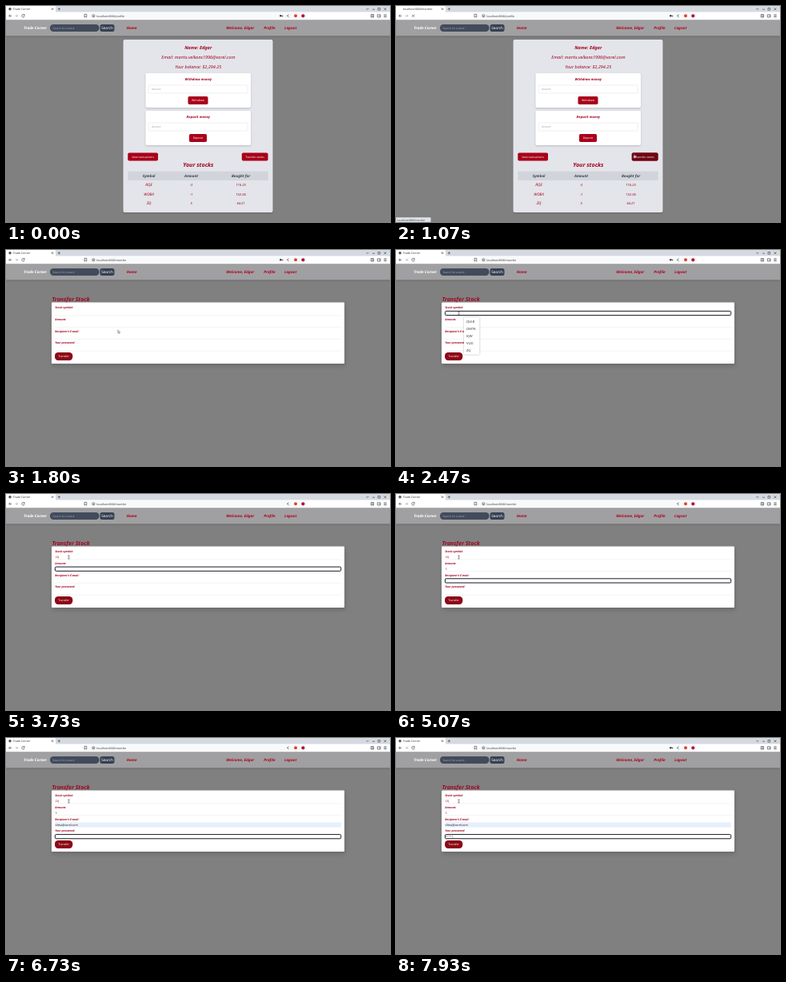
Write an HTML page that moves like this. It is 480 px wide and 270 px high and loops after 8 s.

```html
<!DOCTYPE html>
<html lang="en">
<head>
<meta charset="utf-8">
<title>Trade Corner</title>
<style>
html, body { margin: 0; width: 100%; height: 100%; overflow: hidden; background: #808080; }
svg { display: block; width: 480px; height: 270px; }
text { font-family: "Noto Sans", "Open Sans", sans-serif; text-rendering: geometricPrecision; white-space: pre; }
.b { font-weight: 700; font-style: italic; }
.i { font-style: italic; }
.mid { text-anchor: middle; }
.card { filter: drop-shadow(0 1px 1.2px rgba(0, 0, 0, .18)); }
.pop { filter: drop-shadow(0 .5px 1px rgba(0, 0, 0, .3)); }
.line { fill: none; stroke: #4a4d52; stroke-width: .7; }
</style>
</head>
<body>
<svg id="stage" viewBox="0 0 480 270"></svg>
<script>
const LOOP = 8000;
const RED = '#a3001f', NAV_RED = '#b00020', BUTTON = '#a90019', DARK_RED = '#8c0717', INK = '#33363b';
const NAME = 'Edgar', MAIL = 'martis.velkons1996@vorel.com', FRIEND = 'tilma@vorel.com';
const SITE = 'Trade Corner', HOST = 'localhost:8000/';
const stage = document.getElementById('stage');

function add(parent, tag, attrs = {}) {
  const el = document.createElementNS('http://www.w3.org/2000/svg', tag);
  for (const k in attrs) el.setAttribute(k, attrs[k]);
  return parent.appendChild(el);
}
const group = parent => add(parent, 'g');
const box = (g, x, y, width, height, fill, rx = 0, cls = '') =>
  add(g, 'rect', { x, y, width, height, fill, rx, class: cls });
const line = (g, d, attrs = {}) => add(g, 'path', { d, class: 'line', ...attrs });
const dot = (g, cx, cy, r, fill) => add(g, 'circle', { cx, cy, r, fill });
function label(g, x, y, str, size, fill, cls = '') {
  const el = add(g, 'text', { x, y, 'font-size': size, fill, class: cls });
  el.textContent = str;
  return el;
}

// Visible only between the given times, with hard cuts.
function show(el, ...spans) {
  const on = t => spans.some(([a, b]) => t >= a && t < b) ? 1 : 0;
  const times = [...new Set([0, ...spans.flat(), LOOP])].sort((a, b) => a - b);
  el.animate(times.map(t => ({
    offset: t / LOOP, opacity: on(Math.min(t, LOOP - 1)), easing: 'step-end'
  })), { duration: LOOP, iterations: Infinity });
  return el;
}

function button(g, x, y, w, str, size, fill = BUTTON, rx = 1.7) {
  box(g, x, y, w, 10, fill, rx);
  label(g, x + w / 2, y + 6.3, str, size, '#fff', 'mid');
}

function browser() {
  const g = group(stage);
  box(g, 0, 0, 480, 17, '#d5dae1');
  box(g, 0, 0, 62, 9, '#fff', 1.5);
  box(g, 0, 7.5, 480, 9.7, '#fff');
  box(g, 104, 8.6, 272, 7.4, '#f8f9fa', 2);
  const idle = show(group(g), [0, 930], [1130, LOOP]);
  dot(idle, 5, 3.7, 1.7, '#53575d');
  label(idle, 8.7, 5.1, SITE, 3.5, INK);
  line(idle, 'M22.7 10.9A1.8 1.8 0 1 0 23.2 12.8M23.2 10.2V11.7H21.7');
  const busy = show(group(g), [930, 1130]);
  label(busy, 8.7, 5.1, HOST + 'transfer', 3.4, INK);
  line(busy, 'M20 10.8L23 13.8M23 10.8L20 13.8');
  line(g, 'M56.8 2.5L59.2 4.9M59.2 2.5L56.8 4.9M64.6 3.8H68M66.3 2.1V5.5');
  line(g, 'M450.3 3L451.8 4.5L453.3 3M458 4.2H461M465 2.5H467.6V5.1H465ZM472.5 2.4L475.4 5.3M475.4 2.4L472.5 5.3');
  line(g, 'M7 12.3H3.8L5.3 10.7M3.8 12.3L5.3 13.9');
  line(g, 'M11.6 12.3H14.8L13.3 10.7M14.8 12.3L13.3 13.9', { style: 'stroke:#aaa' });
  line(g, 'M98 10.3H100.8V14.2L99.4 13.1L98 14.2Z');
  line(g, 'M107.8 12.3A1.6 1.6 0 1 0 111 12.3A1.6 1.6 0 1 0 107.8 12.3M109.4 12V13.3');
  label(show(group(g), [0, 1130]), 113.3, 13.6, HOST + 'profile', 3.4, INK);
  label(show(group(g), [1130, LOOP]), 113.3, 13.6, HOST + 'transfer', 3.4, INK);
  const key = show(group(g), [0, 3330], [7270, LOOP]);
  dot(key, 343.2, 12.3, 1.2, '#3c4045');
  line(key, 'M344 12.3H346.3M345.6 12.3V13.4', { style: 'stroke-width:.9' });
  line(g, 'M353.6 10.8L351.2 12.3L353.6 13.8');
  dot(g, 362, 12.3, 2, '#e2442f');
  dot(g, 371.3, 12.3, 2.1, '#b3173c');
  line(g, 'M456.2 10.6H459.6V14H456.2ZM458 10.6V14M464.3 10.8H468V14H464.3ZM466.5 12.4H468M472.3 10.8H475.7M472.3 12.3H475.7M472.3 13.8H475.7');
}

function navbar() {
  const g = group(stage);
  box(g, 0, 17, 480, 20.3, '#a0a0a2', 0, 'card');
  label(g, 22.3, 29.4, SITE, 4.7, '#fff', 'b');
  box(g, 55, 23, 61.5, 9, '#414b5b', 4.2);
  label(g, 58.5, 28.7, 'Search for a stock', 3.25, '#a4abb6');
  box(g, 117.5, 23, 18, 9, '#354052', 2.5);
  label(g, 126.5, 29.3, 'Search', 4.6, '#fff', 'mid');
  for (const [x, str] of [[150.8, 'Home'], [275.3, 'Welcome, ' + NAME], [322.2, 'Profile'], [348, 'Logout']])
    label(g, x, 29.4, str, 4.65, NAV_RED, 'b');
}

function moneyCard(g, y, title, action, w) {
  box(g, 174.5, y, 131.5, 43, '#fff', 1.7, 'card');
  label(g, 240.2, y + 9.4, title, 4.2, RED, 'b mid');
  box(g, 178.3, y + 15, 123.8, 10, '#fff', 1).setAttribute('stroke', '#efeff1');
  label(g, 182, y + 21.1, 'Amount', 3.3, '#a0a0a6', 'i');
  button(g, 240 - w / 2, y + 29, w, action, 3.5);
}

function profile() {
  const g = show(group(stage), [0, 1130]);
  box(g, 146.5, 42, 187, 216, '#e3e5ea', 2, 'card');
  label(g, 240.2, 54, 'Name: ' + NAME, 5.6, RED, 'b mid');
  label(g, 240.4, 66.1, 'Email: ' + MAIL, 5.5, RED, 'i mid');
  label(g, 240.2, 78, 'Your balance: $2,294.25', 5.45, RED, 'i mid');
  moneyCard(g, 84, 'Withdraw money', 'Withdraw', 25);
  moneyCard(g, 131, 'Deposit money', 'Deposit', 22);
  button(g, 152.3, 183.5, 37.7, 'View transactions', 3.4);
  button(g, 294.8, 183.5, 32.7, 'Transfer stocks', 3.35);
  button(show(group(g), [800, 1130]), 294.8, 183.5, 32.7, 'Transfer stocks', 3.35, '#6f0613');
  label(g, 240.4, 201, 'Your stocks', 7.1, RED, 'b mid');
  box(g, 152.3, 206.7, 175.5, 11.2, '#d1d4da');
  const cols = [178.6, 231.6, 293.5];
  ['Symbol', 'Amount', 'Bought for'].forEach((s, i) => label(g, cols[i], 213.9, s, 4.6, '#3a3f4a', 'b mid'));
  [['RQE', '-3', '116.25'], ['WOBX', '-1', '152.06'], ['ZQ', '5', '64.21']].forEach((row, r) =>
    row.forEach((s, i) => label(g, cols[i], 225.4 + r * 11.25, s, i ? 4.1 : 4.7, RED, 'i mid')));
}

const FIELD_Y = [76.1, 90.8, 105.5, 120.3];

// Each step is [time, text]; it stays until the next one or the end.
function typed(g, row, steps, end, caret) {
  steps.forEach(([t, str], i) => {
    const el = label(g, 61.8, FIELD_Y[row] + 4, str, 3.3, RED);
    if (caret) {
      const bar = add(el, 'tspan', { fill: '#111' });
      bar.textContent = '|';
    }
    show(el, [t, i + 1 < steps.length ? steps[i + 1][0] : end]);
  });
}

function menu(g, y, w, items, size, from, to) {
  const m = show(group(g), [from, to]);
  box(m, 85, y, w, items.length * 9.05 + 1.5, '#fff', .8, 'pop');
  items.forEach((s, i) => label(m, 88, y + 6.9 + i * 9.05, s, size, INK));
}

function transfer() {
  const g = show(group(stage), [1130, LOOP]);
  label(g, 57.5, 63.7, 'Transfer Stock', 7, RED, 'b');
  box(g, 57, 65.5, 366, 76.4, '#fff', 1).style.filter = 'drop-shadow(1px 3px 2.5px rgba(0,0,0,.16))';
  ['Stock symbol:', 'Amount:', "Recipient's E-mail:", 'Your password:'].forEach((s, i) => {
    label(g, 61.2, 73.2 + i * 14.75, s, 3.5, RED, 'b');
    line(g, `M61 ${FIELD_Y[i] + 5.8}H419`, { style: 'stroke:#ececee;stroke-width:.6' });
  });
  button(g, 61, 128, 22.3, 'Transfer', 3.5, DARK_RED, 4.2);

  const filled = show(group(g), [6270, LOOP]);
  box(filled, 61.2, FIELD_Y[2], 357.6, 5.7, '#e6effd', .8);
  label(filled, 61.5, FIELD_Y[2] + 4, FRIEND, 3.6, '#222');

  [[2200, 3730], [3730, 5070], [5070, 6670], [6670, LOOP]].forEach((span, i) => {
    const ring = add(g, 'rect', {
      x: 61.4, y: FIELD_Y[i] + .3, width: 357.3, height: 5.2, rx: 1.1,
      fill: 'none', stroke: '#171b24', 'stroke-width': 1
    });
    show(ring, span);
  });

  typed(g, 0, [[3200, 'Z'], [3400, 'ZQ']], LOOP);
  typed(g, 1, [[4670, '5']], LOOP);
  typed(g, 2, [5330, 5470, 5600, 5730, 5870].map((t, i) => [t, FRIEND.slice(0, i + 1)]), 6270, true);
  typed(g, 3, [7200, 7330, 7470, 7670, 7800, 7930].map((t, i) => [t, '•'.repeat(i + 1)]), LOOP, true);

  menu(g, 84, 19.3, ['QVLR', 'OMTA', 'KJW', 'VUD', 'ZQ'], 4.1, 2270, 3200);
  menu(g, 84, 19.3, ['ZQ'], 4.1, 3200, 3530);
  menu(g, 114.3, 40, [FRIEND], 3.9, 5330, 6400);
}

function statusBar() {
  const g = show(group(stage), [800, 1400]);
  box(g, 0, 264.2, 43.5, 5.8, '#dfe2e7', .8);
  label(g, 1.6, 268.5, HOST + 'transfer', 3.2, INK);
}

function pointer() {
  const g = group(stage);
  const path = [[0, 359, 10], [70, 359, 10], [400, 338, 85], [870, 297.5, 185.5], [1200, 297.5, 185.5],
    [1500, 228, 167], [1800, 140, 100], [2000, 87, 60], [2200, 78.5, 79], [LOOP, 78.5, 79]];
  g.animate(path.map(([t, x, y]) => ({ offset: t / LOOP, transform: `translate(${x}px, ${y}px)` })),
    { duration: LOOP, iterations: Infinity });
  const shape = (d, ...spans) => show(
    add(g, 'path', { d, fill: '#fff', stroke: '#222', 'stroke-width': .4, 'stroke-linejoin': 'round' }), ...spans);
  shape('M0 0V4L1 3.2L1.7 4.7L2.3 4.4L1.6 3H2.9Z', [70, 800], [1230, 2130]);
  shape('M0 0Q.5 -.6 .9 0V1.5L2.6 2V3.6L2 4.6H0L-1.2 2.8L-.8 2.4L0 2.9Z', [800, 1230]);
  show(line(g, 'M-.9 -2H.9M0 -2V2M-.9 2H.9', { style: 'stroke:#222;stroke-width:.6' }), [2130, LOOP]);
}

navbar();
browser();
profile();
transfer();
statusBar();
pointer();
</script>
</body>
</html>
```
